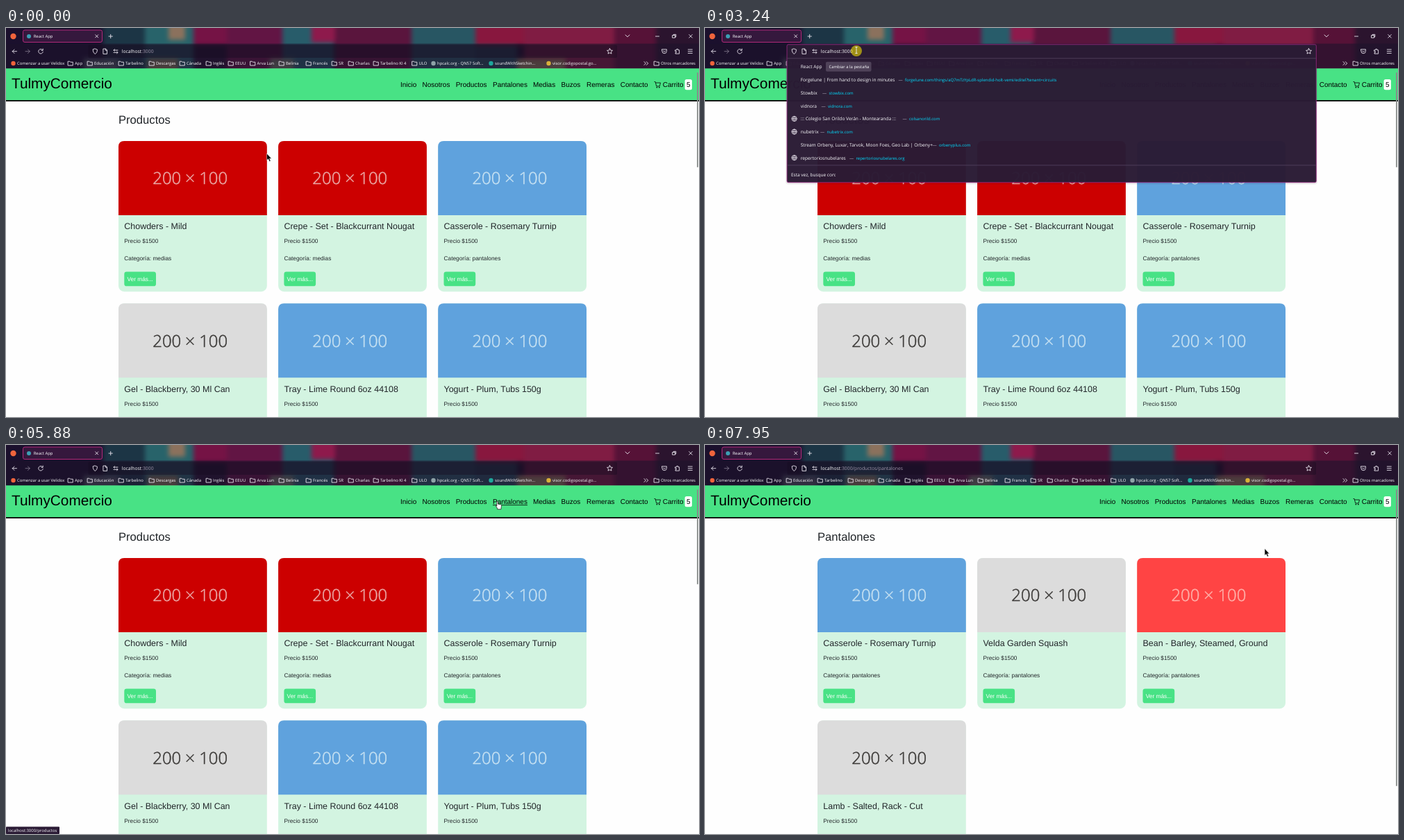
An HTML page that plays this animation: 998x561 px, repeating every 8 s.

```html
<!DOCTYPE html>
<html lang="es">
<head>
<meta charset="utf-8">
<title>TulmyComercio</title>
<style>
html, body { margin: 0; height: 100%; overflow: hidden; background: #fff; }
svg { display: block; width: 100vw; height: 100vh; }
text { font-family: "Liberation Sans", Arial, sans-serif; text-rendering: geometricPrecision; white-space: pre; }
.ui text { font-family: "Open Sans", sans-serif; }
.line { fill: none; stroke: #e9e4ee; stroke-width: .9; stroke-linecap: round; stroke-linejoin: round; }
.dim { stroke: #7d7487; }
.size { font-weight: 300; stroke-width: .5; }
#theme { filter: blur(3px); }
</style>
</head>
<body>
<svg id="stage" viewBox="0 0 998 561"></svg>
<script>
const LOOP = 8000;
const GREEN = '#48e285', INK = '#212529', PANEL = '#2b1b35', CYAN = '#00ddff';
const TONES = {
  red: ['#cc0000', '#eba9a6'],
  coral: ['#ff4444', '#ffb0a9'],
  blue: ['#5fa2dd', '#c6e1f2'],
  grey: ['#dcdcdc', '#3c3a38'],
};

const text = (x, y, s, size, fill = '#fbfbfe', more = '') =>
  `<text x="${x}" y="${y}" font-size="${size}" fill="${fill}" ${more}>${s}</text>`;
const rect = (x, y, w, h, fill, r = 0, more = '') =>
  `<rect x="${x}" y="${y}" width="${w}" height="${h}" fill="${fill}" rx="${r}" ${more}/>`;
const dot = (x, y, r, fill) => `<circle cx="${x}" cy="${y}" r="${r}" fill="${fill}"/>`;
const line = (d, cls = '') => `<path class="line ${cls}" d="${d}"/>`;
const group = (id, content, cls = '') => `<g id="${id}" class="${cls}">${content}</g>`;

function star(x, y, r, more) {
  const points = Array.from({ length: 10 }, (_, i) => {
    const a = (i / 5 - .5) * Math.PI, k = i % 2 ? r * .48 : r;
    return `${(x + k * Math.cos(a)).toFixed(2)},${(y + k * Math.sin(a)).toFixed(2)}`;
  });
  return `<polygon points="${points.join(' ')}" ${more}/>`;
}

// Shop page
function card([name, tone, category], i) {
  const x = 162 + (i % 3) * 230.1, y = 163 + Math.floor(i / 3) * 234.3;
  const [back, front] = TONES[tone];
  return rect(x, y, 213.8, 217.3, '#d3f4e1', 8.3) +
    `<path d="M${x} ${y + 107}v-98.7q0-8.3 8.3-8.3h197.2q8.3 0 8.3 8.3v98.7z" fill="${back}"/>` +
    `<g class="ui">${text(x + 103.2, y + 62.3, '200 × 100', 23.9, front, `class="size" stroke="${front}" text-anchor="middle"`)}</g>` +
    text(x + 8.3, y + 127.2, name, 12.48, INK) +
    text(x + 8.3, y + 147.3, 'Precio $1500', 8.32, INK) +
    text(x + 8.3, y + 172.2, 'Categoría: ' + category, 8.32, INK) +
    rect(x + 8.3, y + 188.5, 45.7, 20.8, GREEN, 3.4) +
    text(x + 12.5, y + 201.6, 'Ver más...', 8.32, '#fff');
}

const shopPage = (id, title, cards) =>
  group(id, text(162, 138.2, title, 16.63, INK) + cards.map(card).join(''));

const allProducts = [
  ['Chowders - Mild', 'red', 'medias'],
  ['Crepe - Set - Blackcurrant Nougat', 'red', 'medias'],
  ['Casserole - Rosemary Turnip', 'blue', 'pantalones'],
  ['Gel - Blackberry, 30 Ml Can', 'grey', 'medias'],
  ['Tray - Lime Round 6oz 44108', 'blue', 'medias'],
  ['Yogurt - Plum, Tubs 150g', 'blue', 'medias'],
];
const trousers = [
  ['Casserole - Rosemary Turnip', 'blue', 'pantalones'],
  ['Velda Garden Squash', 'grey', 'pantalones'],
  ['Bean - Barley, Steamed, Ground', 'coral', 'pantalones'],
  ['Lamb - Salted, Rack - Cut', 'grey', 'pantalones'],
];

const links = [[568, 'Inicio'], [599.5, 'Nosotros'], [647.7, 'Productos'], [701, 'Pantalones'],
  [759, 'Medias'], [799.6, 'Buzos'], [836, 'Remeras'], [884.7, 'Contacto'], [945.7, 'Carrito']];

const navbar = rect(0, 58.3, 998, 46.7, GREEN) + rect(0, 104, 998, 1.8, '#000') +
  text(8, 86.5, 'TulmyComercio', 20.8, '#000') +
  links.map(([x, s]) => text(x, 85.3, s, 9.98, '#000')).join('') +
  `<path d="M933.5 77.5h1.6l1.6 6.4h4.6l1.2-4.9h-7" fill="none" stroke="#000" stroke-width=".8"/>` +
  dot(937.4, 85.6, .9, '#000') + dot(940.8, 85.6, .9, '#000') +
  rect(977.6, 74, 10.3, 15.3, '#fff', 2.5) + text(980, 85.3, '5', 9.98, '#000') +
  rect(647.7, 86.3, 45, .8, '#000', 0, 'id="underProducts"') +
  rect(701, 86.3, 50, .8, '#000', 0, 'id="underTrousers"');

// Browser chrome
const blocks = [
  [-9, -9, 160, 76, '#1c1230'], [140, -9, 60, 76, '#1d3d4c'],
  [200, -9, 70, 76, '#2c7378'], [234, -9, 24, 26, '#a08468'],
  [270, -9, 50, 34, '#86154c'], [318, -9, 80, 76, '#70174b'],
  [398, -9, 74, 76, '#2b6b78'], [440, -9, 36, 30, '#a31d54'],
  [474, -9, 110, 76, '#661743'], [584, -9, 92, 76, '#2c6470'],
  [676, -9, 70, 34, '#9c1a44'], [676, 25, 60, 42, '#2a5563'],
  [746, -9, 130, 76, '#93204a'], [876, -9, 60, 76, '#61143c'], [936, -9, 72, 76, '#2f1631'],
  [112, 44, 50, 23, '#57606a'], [204, 44, 44, 23, '#96875f'],
  [380, 44, 34, 23, '#7f8870'], [736, 44, 70, 23, '#a58a60'],
];

const bookmarks = [[99, 'App'], [127, 'Educación'], [172, 'Tarbelino'], [216, 'Descargas'], [260, 'Cánada'],
  [298, 'Inglés'], [330, 'EEUU'], [361.5, 'Arva Lun'], [403, 'Belinia'], [442, 'Francés'], [479, 'SR'],
  [503, 'Charlas'], [539, 'Tarbelino KI 4'], [594.5, 'ULO'], [943, 'Otros marcadores']];
const sites = [[16, 'Comenzar a usar Velidox', '#f0643c'], [621, 'hpcalc.org - QN57 Soft...', '#8fa3a8'],
  [704, 'soundWithSketchin...', '#1fa79c'], [787, 'visor.codigopostal.go...', '#d8b03a']];

const folder = x => line(`M${x} 48.2h2.4l1 1h3.4v4.8h-6.8z`);
const chrome = rect(0, 0, 998, 59, '#2a1535') +
  group('theme', blocks.map(([x, y, w, h, c]) => rect(x, y, w, h, c)).join('')) +
  rect(0, 22.5, 998, 36, 'rgba(27,18,42,.64)') + rect(0, 0, 998, 22.5, 'rgba(20,10,30,.15)') +
  dot(10.5, 12, 4.2, '#f0643c') +
  rect(24.5, 3, 114, 17.5, 'rgba(58,26,64,.88)', 2.5, 'stroke="#c02c80" stroke-width=".9"') +
  dot(33, 12, 3, '#3c9fb4') + text(39.7, 14.2, 'React App', 5.95) +
  line('M128.7 9.8l4 4m0-4l-4 4M148 12h5.4M150.7 9.3v5.4') +
  line('M892 10l3 2.8 3-2.8M935.5 12h5M983.7 9.5l4.6 4.6m0-4.6l-4.6 4.6M960 10.5h3.6v3.6h-3.6zM961.2 10.5v-1.2h3.6v3.6h-1.2') +
  line('M15.5 33.7h-6.3m2.8-2.8l-2.8 2.8 2.8 2.8M52.6 31.6a3.3 3.3 0 1 0 .7 2.8M53.2 30v2.3h-2.3') +
  line('M28 33.7h6.3m-2.8-2.8l2.8 2.8-2.8 2.8', 'dim') +
  line('M944.8 30.8h6.6v2.6a3.3 3.3 0 0 1-6.6 0zM946.5 33l1.6 1.5 1.6-1.5M964 31.8h1.8v-1.4h2v1.4h1.8v5.3h-5.6v-1.6h1.2v-2h-1.2zM982.3 31h6M982.3 33.7h6M982.3 36.4h6') +
  rect(118.5, 24.3, 761.5, 18.8, 'rgba(22,11,32,.4)', 2, 'id="field"') +
  bookmarks.map(([x, s]) => folder(x - 9.5) + text(x, 53.3, s, 5.95)).join('') +
  sites.map(([x, s, c]) => dot(x - 5.5, 51, 3.2, c) + text(x, 53.3, s, 5.95)).join('') +
  line('M919 48.6l2.4 2.4-2.4 2.4M922.3 48.6l2.4 2.4-2.4 2.4');

// Address suggestions: title, address, address x, icon colour (globe when empty), bookmarked
const suggestions = [
  ['React App', '', 0, '#e2574c'],
  ['Forgelune | From hand to design in minutes', 'forgelune.com/things/aQ7mTzYpLdR-splendid-holt-vemi/editel?tenant=circuits', 288, '#d9584a', true],
  ['Stowbix', 'stowbix.com', 178.5, '#12b4c8'],
  ['vidnora', 'vidnora.com', 177, '#d8202f', true],
  ['::: Colegio San Orildo Verán - Montearanda :::', 'colsanorild.com', 294, ''],
  ['nubetrix', 'nubetrix.com', 175.5, ''],
  ['Stream Orbeny, Luxar, Tarvok, Moon Foes, Geo Lab | Orbeny+', 'orbenyplus.com', 337, '#163a78'],
  ['repertoriosnubelares', 'repertoriosnubelares.org', 217.5, ''],
];
const globe = y => line(`M125 ${y}a3.6 3.6 0 1 0 7.2 0a3.6 3.6 0 1 0-7.2 0h7.2M128.6 ${y - 3.6}q-3 3.6 0 7.2q3-3.6 0-7.2`);
const rowY = i => 56 + i * 18.73;

const rows = suggestions.map(([title, address, x, colour], i) => {
  const y = rowY(i) + 2.4;
  return text(137.7, y, title, 6.6) + (colour ? '' : globe(rowY(i))) +
    (x ? text(x - 9.5, y, '—', 6.2, '#b9b0c2') + text(x, y, address, 6, CYAN) : '');
}).join('');

const lateIcons = suggestions.map(([, , , colour, marked], i) =>
  (colour ? rect(124.8, rowY(i) - 3.6, 7.2, 7.2, colour, 1) : '') +
  (marked ? star(131, rowY(i) + 3.5, 3, `fill="${CYAN}"`) : '')).join('') +
  ['#eef0f4', '#1aa0c8', '#de5833', '#e8e6e6', '#f4f4f4'].map((c, i) => dot(208.5 + i * 20.8, 211, 4, c)).join('') +
  star(312.3, 211, 4.4, `fill="${CYAN}"`) +
  line('M329.3 208h8v6h-8zM350 211a3.8 3.8 0 1 0 7.6 0a3.8 3.8 0 1 0-7.6 0M353.8 208.8v2.3h1.8') +
  `<circle class="line" cx="869.5" cy="211" r="3.2" stroke-dasharray="1.5 1"/><circle class="line" cx="869.5" cy="211" r="2"/>`;

const dropdown = rect(116, 23, 766, 202.5, 'rgba(0,0,0,.07)', 4) +
  rect(118, 23.8, 762.3, 199, PANEL, 2, 'fill-opacity=".975" stroke="#a02b88" stroke-width=".8"') +
  rect(118.5, 43.5, 761.3, .7, '#5b4a66') + rect(118.5, 197.6, 761.3, .7, '#5b4a66') + rows +
  rect(174, 48.7, 65.5, 14, '#4f4259', 2) + text(178.5, 58.3, 'Cambiar a la pestaña', 5.9) +
  text(124, 213.6, 'Esta vez, busque con:', 6.5) + group('lateIcons', lateIcons);

const address = rect(136, 26.3, 14, 14, '#5a4d64', 2, 'id="pageHover"') +
  rect(166.5, 28.5, 47, 10.2, '#3c7089', 0, 'id="selection"') +
  line('M128.3 30l3.2 1.2q.2 4.3-3.2 6.4q-3.4-2.1-3.2-6.4zM140.3 30h3.2l2 2v5.4h-5.2zM143.3 30v2.2h2.2M155 32h6M156.4 30.6l-1.4 1.4 1.4 1.4M161 35.4h-6M159.6 34l1.4 1.4-1.4 1.4') +
  star(869.5, 33.7, 4.2, 'class="line"') +
  `<text x="166.7" y="36" font-size="6.8" fill="#fbfbfe">localhost<tspan id="path"></tspan></text>`;

const pointer = `<circle id="click" r="8" cx="0" cy="1" fill="#ffee00" fill-opacity=".55"/>
  <path id="arrow" d="M0 0V9.7L2.2 7.7 3.9 11.4 5.5 10.7 3.9 7.2H6.8Z" fill="#0a0a0a" stroke="#fff" stroke-width=".4"/>
  <path id="hand" d="M-1.2 7V1q0-1 .9-1t.9 1V4l4 .8q1 .3 1 1.4L5 9.4V11.5H-.5V9.8L-2.8 6.8Q-2.4 5.6-1.2 7Z" stroke="#1a0a14" stroke-width=".7"/>
  <path id="beam" d="M-1.6-4.5H1.6M0-4.5V4.5M-1.6 4.5H1.6" fill="none" stroke="#f2f2f2" stroke-width=".9"/>`;

const status = rect(0, 550.5, 10, 10.5, PANEL, 1, 'id="statusBack"') + text(3, 558, '', 5.95, '#fbfbfe', 'id="statusText"');

document.getElementById('stage').innerHTML =
  rect(0, 0, 998, 561, '#fefefe') + shopPage('home', 'Productos', allProducts) +
  shopPage('filtered', 'Pantalones', trousers) + group('chrome', chrome, 'ui') + navbar +
  rect(995, 64, 1.8, 137, '#878b89', .9, 'id="scroll"') + group('status', status, 'ui') +
  group('dropdown', dropdown, 'ui') + group('address', address, 'ui') + group('pointer', pointer);

// Pointer route: time, x, y
const route = [
  [0, 375.5, 181], [690, 375.5, 181], [1500, 117, 80], [1700, 117, 80], [1900, 124, 73],
  [2330, 360, 82], [2400, 362, 82.5], [2680, 362, 82.5], [2860, 300, 105], [3120, 218, 32],
  [3450, 218, 32], [3780, 143, 34], [4000, 141, 67], [4090, 141, 67], [4500, 76, 272.8],
  [4650, 76, 272.8], [4910, 187, 243], [5560, 672, 82], [5720, 686, 83], [6000, 722, 80],
  [6370, 720, 80], [7100, 720, 80], [7880, 804, 149], [7950, 806, 149.5], [LOOP, 806, 149.5],
];
function pointerAt(t) {
  const i = route.findIndex(p => p[0] > t), [t0, x0, y0] = route[i - 1], [t1, x1, y1] = route[i];
  const u = (t - t0) / (t1 - t0), k = u * u * (3 - 2 * u);
  return [x0 + (x1 - x0) * k, y0 + (y1 - y0) * k];
}

const el = id => document.getElementById(id);
const show = (id, on) => { el(id).style.display = on ? '' : 'none'; };

function draw(t) {
  const within = (a, b) => t >= a && t < b;
  const open = within(3240, 4560), filtered = t >= 7110;
  const hand = within(1430, 2120) || within(5540, 7180), beam = within(3040, 3700);

  show('home', !filtered);
  show('filtered', filtered);
  el('scroll').setAttribute('height', filtered ? 428 : 137);
  show('underProducts', within(5560, 5860));
  show('underTrousers', within(5860, 7110));

  show('dropdown', open);
  show('lateIcons', t >= 3310);
  show('selection', within(3310, 4560));
  show('pageHover', within(3740, 4140));
  el('field').setAttribute('fill', within(3170, 4560) ? PANEL : 'rgba(22,11,32,.4)');
  const path = el('path');
  path.textContent = t >= 6640 ? ':3000/productos/pantalones' : ':3000';
  path.setAttribute('fill', open ? '#fbfbfe' : '#a095aa');

  const hover = within(1570, 2190) ? '' : within(5750, 5900) ? '/productos' :
    within(5900, 6710) ? '/productos/pantalones' : null;
  show('status', hover !== null);
  if (hover !== null) {
    el('statusText').textContent = 'localhost:3000' + hover;
    el('statusBack').setAttribute('width', 48 + hover.length * 2.9);
  }

  const [x, y] = pointerAt(t);
  el('pointer').setAttribute('transform', `translate(${x.toFixed(2)} ${y.toFixed(2)})`);
  show('arrow', !hand && !beam);
  show('hand', hand);
  show('beam', beam);
  show('click', within(3170, 3400) || within(4500, 4760) || within(6570, 6790));
  el('arrow').setAttribute('fill', within(2400, 2690) ? '#a3d9b8' : '#0a0a0a');
  el('hand').setAttribute('fill', t > 6570 ? '#d42f6c' : '#fff');
}

function tick() {
  draw(performance.now() % LOOP);
  requestAnimationFrame(tick);
}
tick();
</script>
</body>
</html>
```
